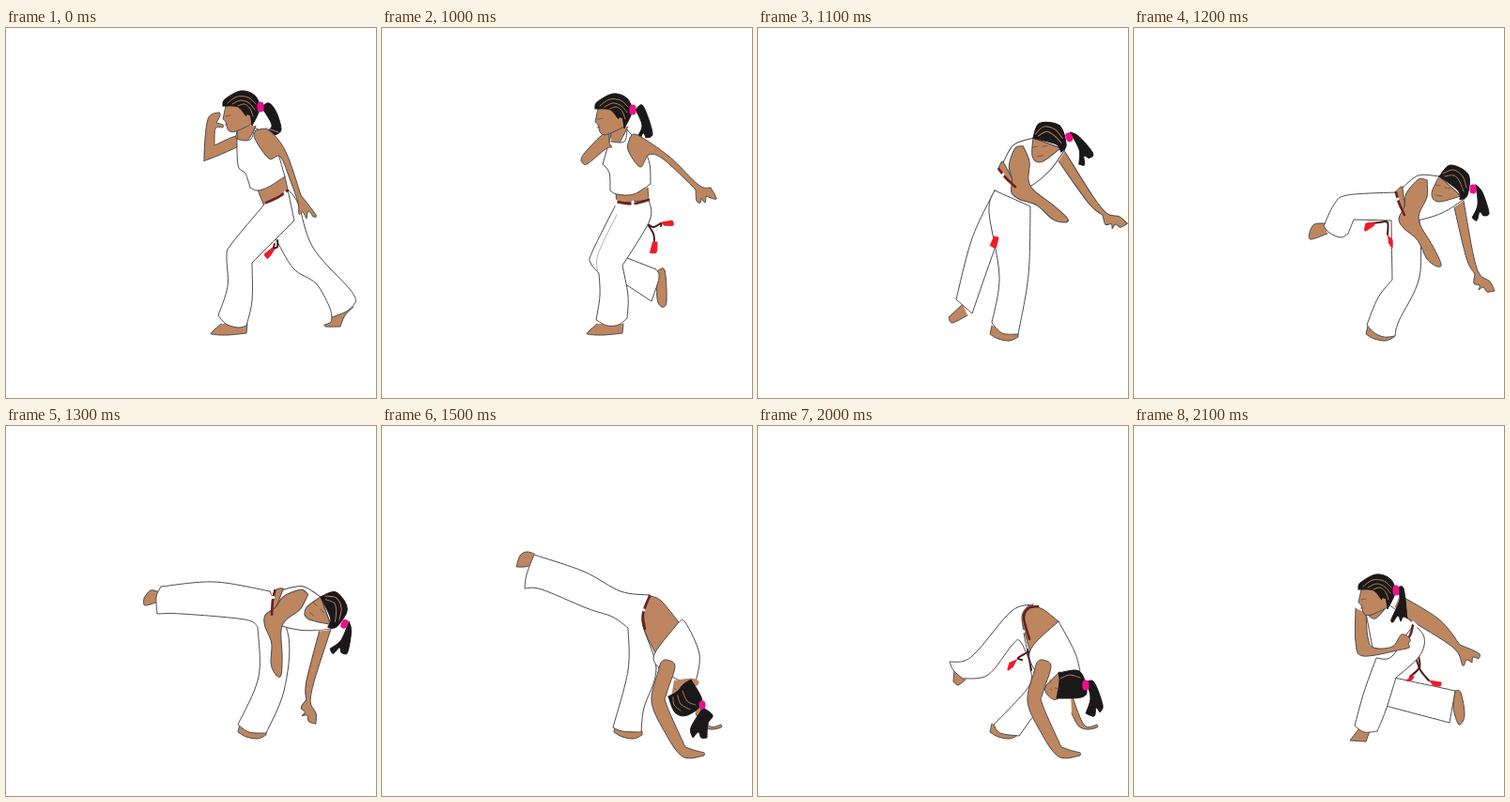
Write an HTML page with a canvas that moves like this. It is 394x394 px and loops after 2200 ms.

```html
<!DOCTYPE html>
<html lang="en">
<head>
<meta charset="utf-8">
<title>Kick turn</title>
<style>
html, body { margin: 0; width: 100%; height: 100%; overflow: hidden; background: #fff }
canvas { display: block; width: 394px; height: 394px }
</style>
</head>
<body>
<canvas></canvas>
<script>
const canvas = document.querySelector('canvas');
const ctx = canvas.getContext('2d');
const ratio = window.devicePixelRatio || 1;
canvas.width = canvas.height = 394 * ratio;
ctx.scale(ratio, ratio);
ctx.lineJoin = ctx.lineCap = 'round';

// Smooth spline through the points; "/" marks a corner.
function curve(text) {
  const path = new Path2D();
  let last;
  for (const run of text.split(' / ')) {
    const pts = run.split(' ').map(s => s.split(',').map(Number));
    if (last) pts.unshift(last);
    else path.moveTo(...pts[0]);
    for (let i = 1; i < pts.length; i++) {
      const a = pts[i - 1], b = pts[i];
      const before = pts[i - 2] || a, after = pts[i + 1] || b;
      const c1 = a.map((v, k) => v + (b[k] - before[k]) / 6);
      const c2 = b.map((v, k) => v - (after[k] - a[k]) / 6);
      path.bezierCurveTo(...c1, ...c2, ...b);
    }
    last = pts.at(-1);
  }
  return path;
}

const pen = (fill, stroke, width = 1) => text => {
  const path = curve(text);
  if (fill) { ctx.fillStyle = fill; ctx.fill(path); }
  if (stroke) { ctx.strokeStyle = stroke; ctx.lineWidth = width; ctx.stroke(path); }
};
const tan = '#bd865f', ink = '#4b4b4f', black = '#1b1819';
const skin = pen(tan, ink), patch = pen(tan), white = pen('#fff', ink);
const hair = pen(black, black), red = pen('#ed1c24', '#ed1c24');
const braid = pen(null, tan, .9), line = pen(null, ink, .7), fold = pen(null, '#a5a9b2', .9);
const belt = pen(null, '#6b201c', 2.6), cord = pen(null, '#4a1718', 2);
const band = pen(null, '#ec0f8c', 7), loop = pen(null, '#fff', 3);

function place(draw, dx, dy, turn = 0, cx = 0, cy = 0) {
  ctx.save();
  ctx.translate(cx + dx, cy + dy);
  ctx.rotate(turn * Math.PI / 180);
  ctx.translate(-cx, -cy);
  draw();
  ctx.restore();
}

function head() {
  skin('234,83 231,97 / 234,100 237,109 245,110 262,102 / 264,88 252,82 234,83');
  hair('231,83 233,76 250,67 265,72 270,86 262,104 / 260,93 256,94 247,84 231,83');
  braid('236,80 246,73 258,74 266,81');
  braid('241,81 250,77 259,80 265,87');
  braid('247,83 254,81 260,86 263,94');
  patch('257,92 260,95 255,102 254,97');
  line('234,94 239,93');
  line('233,103 236,103');
  band('271,82 271,86');
}

function flatFoot() {
  skin('229,315 220,323 / 219,326 235,327 256,325 / 257,315');
}

function toes() {
  skin('249,317 247,326 / 256,331 268,333 277,329 / 277,325');
}

function leanBody() {
  skin('341,191 354,245 363,262 / 362,272 368,274 367,279 / 372,276 376,281 384,280 / 379,270 368,262 361,240 351,184');
  skin('278,175 286,169 294,180 290,203 / 278,175');
  white('286,170 303,157 325,158 / 352,182 / 328,197 301,205 290,203 / 286,170');
  skin('325,158 317,176 324,185 348,179 / 325,158');
  hair('325,158 337,146 356,156 355,178 347,183 / 345,173 325,158');
  braid('329,155 340,151 350,158 354,170');
  braid('331,158 341,157 347,164 351,174');
  line('321,167 326,168');
  line('331,170 336,171');
  line('322,178 328,179');
  hair('364,167 371,175 378,197 372,200 / 368,196 365,205 360,202 / 366,188 364,167');
  band('361,170 361,173');
  skin('312,162 303,161 290,176 288,190 282,203 287,213 302,226 312,246 323,254 327,251 318,232 305,210 304,197 312,180 312,162');
  belt('279,175 282,186 288,199');
  loop('277,184 281,182');
}

function farArm() {
  skin('333,283 347,318 361,318 / 361,321 350,323 341,319 334,306');
}

function nearArm() {
  skin('294,262 297,252 303,249 312,256 303,285 303,297 323,342 / 335,346 343,348 343,351 / 320,352 300,324 287,293 294,262');
}

function stride() {
  skin('347,306 346,313 339,316 / 341,318 356,318 / 361,306 370,297');
  white('300,172 311,187 327,234 366,278 373,291 / 364,301 347,308 / 344,296 330,272 306,256 287,224');
  flatFoot();
  red('285,233 275,241 / 279,245 287,234');
  cord('289,226 289,233 285,234 286,230');
  skin('268,172 275,190 / 300,172 / 297,158');
  white('275,188 240,230 235,243 236,275 226,306 / 234,315 247,319 256,317 / 262,290 262,250 / 307,205 / 300,172');
  belt('277,186 290,180 300,173');
  loop('297,175 299,180');
  skin('227,90 215,97 211,137 215,140 246,127 / 246,115 222,125 / 223,107 231,106 / 231,103 224,101 / 228,93 227,90');
  hair('272,84 280,80 288,90 293,108 287,114 / 277,110 / 283,103 272,84');
  fold('276,106 290,111');
  skin('247,104 246,118 253,123 260,116 266,104');
  white('246,111 247,146 255,155 260,170 / 268,173 280,169 297,158 / 284,120 265,106 / 260,119 246,118 246,111');
  head();
  skin('266,109 280,109 298,132 314,178 / 330,199 327,201 / 322,195 320,203 / 316,196 312,198 311,186 303,163 292,137 280,139 265,118 266,109');
}

function turn() {
  skin('293,259 301,258 303,291 298,297 293,288 293,259');
  white('256,243 292,257 / 295,266 287,291 / 258,272');
  flatFoot();
  skin('249,176 250,187 / 284,183 / 283,170');
  cord('282,208 289,212 297,208 297,211');
  cord('283,209 289,219 290,227');
  red('298,207 309,205 / 310,210 300,210');
  red('288,228 293,228 / 292,239 285,239');
  white('250,186 224,238 222,250 231,261 / 232,285 228,311 / 240,317 252,316 261,309 / 262,285 256,253 / 285,205 284,183 / 267,188 250,186');
  fold('250,199 230,241 230,262');
  belt('250,185 267,187 284,183');
  loop('267,185 267,190');
  loop('249,184 249,188');
  hair('270,87 278,83 288,112 281,117 / 278,112 273,122 271,118 277,104 270,87');
  skin('244,106 243,122 250,126 262,105');
  white('244,114 235,145 / 242,154 243,173 / 250,177 268,177 286,166 / 283,138 261,108 / 258,121 244,121');
  skin('212,141 215,134 233,115 242,112 / 242,122 245,127 / 238,129 218,145 212,141');
  place(head, -4, 3);
  skin('264,117 262,130 275,148 284,135 300,140 334,172 / 335,184 339,186 340,181 / 344,186 345,179 / 356,182 350,170 / 337,167 306,137 272,114 264,117');
}

function lean() {
  skin('218,294 203,308 / 207,314 223,306');
  white('252,173 228,224 211,289 / 228,304 / 257,222 275,185');
  toes();
  white('252,173 246,196 257,264 249,314 / 260,325 277,326 / 288,263 290,190 / 252,173');
  red('251,222 256,223 / 253,234 247,231');
  place(leanBody, -17, -27, -22, 282, 190);
}

function reach() {
  skin('203,208 192,209 187,217 / 188,225 206,219');
  toes();
  white('279,175 227,178 213,188 202,211 / 208,218 220,223 228,219 / 234,204 / 274,205 / 275,268 / 260,287 248,316 / 255,324 266,329 278,328 / 282,312 304,265 304,205 / 279,175');
  cord('254,208 262,207 270,207 270,220');
  red('256,207 247,208 / 246,216 256,210');
  red('270,221 275,225 / 275,234 271,228');
  leanBody();
}

function dip() {
  skin('164,177 154,175 147,183 / 148,191 165,186');
  toes();
  white('281,176 222,166 165,171 / 160,182 161,200 / 187,200 254,206 268,214 / 269,267 247,318 / 259,326 277,327 / 296,282 301,225 281,176');
  place(leanBody, 0, 0, 28, 282, 190);
}

function kick() {
  skin('162,136 154,134 147,138 143,150 / 152,150 159,148');
  toes();
  white('285,180 254,176 215,155 162,137 / 154,158 152,173 / 170,174 218,194 245,203 262,215 / 262,260 246,321 / 256,325 276,326 / 279,300 292,258 277,208 285,180');
  farArm();
  skin('285,181 297,186 316,209 / 291,242 / 277,208 285,181');
  white('316,209 323,209 338,243 334,273 / 315,270 295,258 / 290,243 316,209');
  patch('311,271 332,269 336,276 308,288');
  hair('305,288 312,305 325,308 341,294 329,270 / 321,275 314,283 305,288');
  braid('310,289 311,297 318,303');
  braid('315,287 318,296 328,302');
  braid('320,282 325,293 334,297');
  line('311,279 313,281');
  hair('342,300 329,321 331,332 / 337,326 340,332 346,332 / 347,317 352,308 342,300');
  band('341,296 341,298');
  nearArm();
  belt('285,181 278,200 280,216');
  loop('275,194 279,196');
}

function tuck() {
  skin('209,260 208,272 / 213,276 221,270');
  toes();
  white('290,258 288,278 251,318 / 258,327 278,330 / 298,302');
  white('293,190 270,197 235,238 220,250 204,251 / 208,260 218,269 / 245,265 270,234 279,229 290,252 / 282,210 293,190');
  farArm();
  skin('288,191 303,195 321,209 / 290,241 / 281,205 288,191');
  belt('298,192 288,194 283,204 289,227');
  loop('280,217 283,219');
  cord('289,240 277,247 281,249');
  cord('287,238 291,260');
  red('276,249 268,252 / 266,260 272,256');
  white('320,208 337,240 343,261 / 325,272 307,278 / 289,242 320,208');
  skin('321,262 306,278 310,288 318,291 326,280 321,262');
  hair('320,263 342,261 350,281 344,289 318,290 / 321,272 320,263');
  braid('322,269 332,265 343,268');
  line('311,270 312,273');
  line('311,280 313,281');
  line('316,279 321,280');
  hair('350,272 358,273 367,297 364,305 / 360,300 358,309 349,306 / 354,290 350,272');
  band('349,274 349,278');
  nearArm();
}

function rise() {
  skin('342,282 348,284 352,308 346,318 340,300 342,282');
  white('277,268 342,282 / 336,316 / 268,298');
  cord('303,245 304,257 294,267');
  cord('300,246 305,260 314,271');
  red('297,265 290,271 / 295,271 298,267');
  red('314,271 327,273 / 326,277 318,276');
  skin('239,323 230,335 / 247,336 / 251,325');
  white('297,210 309,225 304,245 279,268 / 268,303 259,325 / 245,326 235,319 / 245,283 258,247 / 275,245 297,210');
  skin('283,180 325,206 347,233 / 367,242 367,248 / 361,246 360,252 / 354,249 350,255 340,236 292,205 278,192');
  skin('248,194 248,203 258,206 272,186');
  white('247,199 254,236 / 275,237 299,211 / 285,200 271,190 / 257,205 247,199');
  belt('297,212 294,223 287,231');
  loop('297,209 301,213');
  skin('236,194 236,230 244,245 285,238 / 293,236 292,232 / 294,227 285,222 275,235 255,236 249,225 247,199');
  hair('280,173 287,173 291,205 / 287,203 284,208 / 281,202 276,209 / 274,206 283,185 280,173');
  place(head, 8, 91);
}

const raise = () => place(kick, 0, 0, -2.4, 260, 330);

function poseAt(t) {
  if (t < 1000) return stride;
  if (t < 1500) return [turn, lean, reach, dip, raise][Math.floor(t / 100) - 10];
  if (t < 2000) return kick;
  return t < 2100 ? tuck : rise;
}

const start = performance.now();
function tick() {
  ctx.fillStyle = '#fff';
  ctx.fillRect(0, 0, 394, 394);
  poseAt((performance.now() - start) % 2200)();
  requestAnimationFrame(tick);
}
tick();
</script>
</body>
</html>
```
